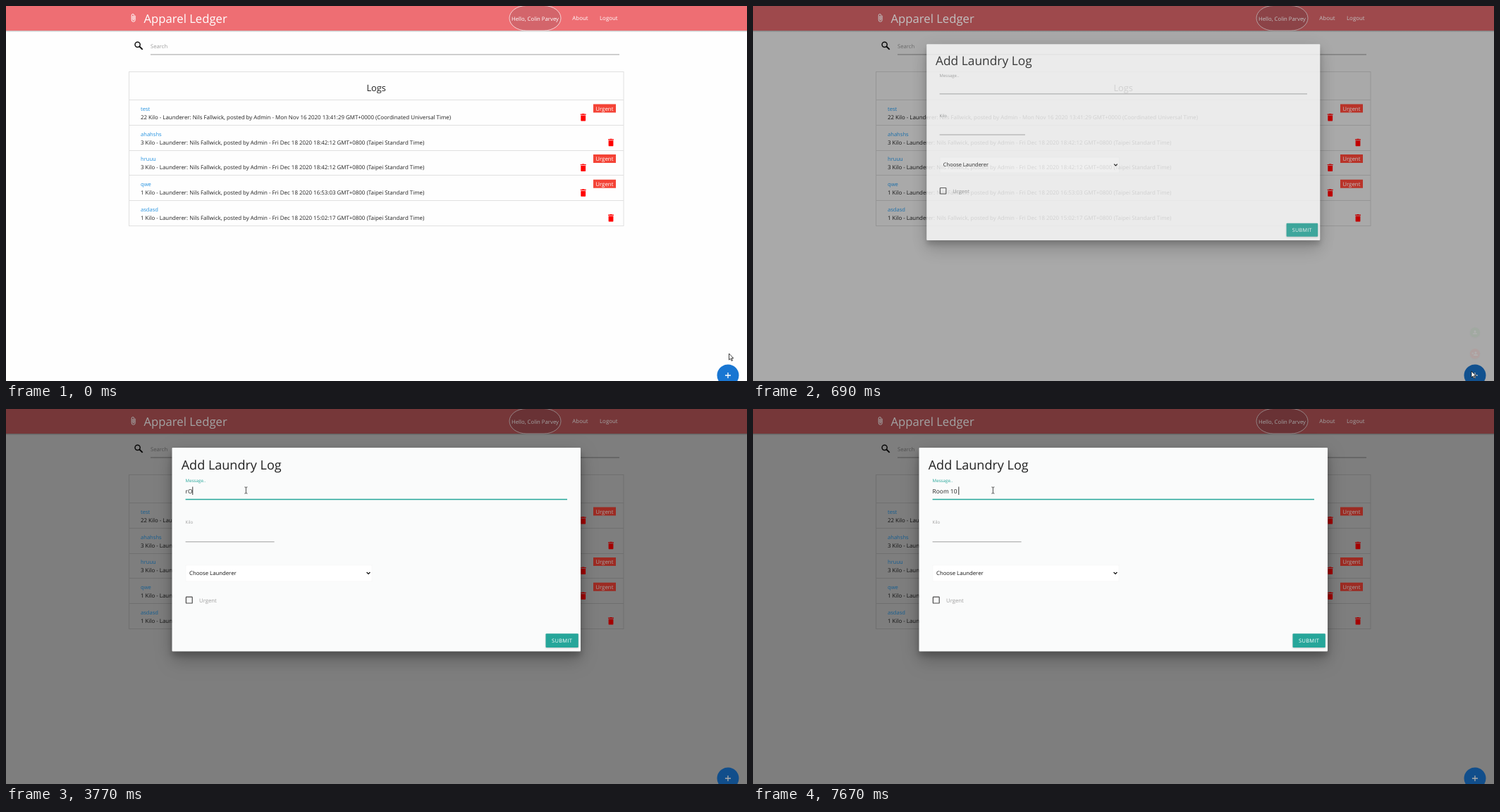
These frames come from a looping animation (1051x533 px, 8000 ms). An HTML page:

```html
<!DOCTYPE html>
<html lang="en">
<head>
<meta charset="utf-8">
<title>Add Laundry Log</title>
<style>
  html, body { margin: 0; width: 100%; height: 100%; overflow: hidden; background: #fefefe; }
  svg { display: block; width: 100%; height: 100%; }
  text { font: 7.92px "Open Sans", "Noto Sans", sans-serif; text-rendering: geometricPrecision; fill: #212121; }
  .white { fill: #fff; }
  .grey { fill: #9e9e9e; }
  .link { fill: #2492e0; font-size: 7.6px; }
  .label { fill: #9e9e9e; font-size: 6.2px; }
  .rule { stroke: #9e9e9e; fill: none; }
  .border { stroke: #e0e0e0; fill: none; }
  #sheet { filter: drop-shadow(0 6px 4px rgba(0,0,0,.2)) drop-shadow(0 5px 13px rgba(0,0,0,.14)) drop-shadow(0 13px 11px rgba(0,0,0,.14)); }
  #submit { filter: drop-shadow(0 1px 1px rgba(0,0,0,.2)); }
  .mini { filter: drop-shadow(0 1px 1px rgba(0,0,0,.25)); }
</style>
</head>
<body>
<svg viewBox="0 0 1051 533" xmlns="http://www.w3.org/2000/svg">
  <defs>
    <path id="trash" fill="#f00" d="M-3.4-3.1h6.8v7q0 1.2-1.2 1.2h-4.4q-1.2 0-1.2-1.2zM-4-5h2.1l.6-.6h2.6l.6.6H4v1.2h-8z"/>
    <g id="person" fill="#fff"><circle cy="-1.5" r="1.5"/><path d="M-3 2.6v-.7q0-1.5 3-1.5t3 1.5v.7z"/></g>
    <linearGradient id="drop" x2="0" y2="1">
      <stop stop-color="#000" stop-opacity=".24"/><stop offset="1" stop-color="#000" stop-opacity="0"/>
    </linearGradient>
  </defs>

  <rect width="1051" height="533" fill="#fefefe"/>
  <g id="page">
    <rect y="35" width="1051" height="2.4" fill="url(#drop)"/>
    <rect width="1051" height="35" fill="#ee6e73"/>
    <rect x="714" y="-.5" width="73" height="35.5" rx="24" ry="17.8" fill="#8a5055" fill-opacity=".27"/>
    <circle cx="186.6" cy="54.8" r="3.6" fill="none" stroke="#111" stroke-width="1.5"/>
    <path d="M189.3 57.5l4.4 4.4" stroke="#111" stroke-width="1.9"/>
    <text x="205" y="60" class="grey" style="font-size:7.7px">Search</text>
    <path class="rule" d="M205 69H870"/>
    <rect class="border" x="174.5" y="93.5" width="701.5" height="219"/>
    <text x="525.2" y="121" text-anchor="middle" style="font-size:12.8px">Logs</text>
  </g>

  <rect id="shade" width="1051" height="533"/>

  <g id="accents">
    <path d="M183.2 13.6v6.2a2.5 2.5 0 0 1-5 0v-6.6a1.7 1.7 0 0 1 3.4 0v6a.8.8 0 0 1-1.7 0v-5.2" fill="none" stroke="#fff"/>
    <text x="195.5" y="24" class="white" style="font-size:16.7px">Apparel Ledger</text>
    <rect x="714" y="-.5" width="73" height="35.5" rx="24" ry="17.8" fill="none" stroke="#fff" stroke-width=".7"/>
    <text x="750.5" y="20.6" class="white" text-anchor="middle" style="font-size:7.75px">Hello, Colin Parvey</text>
    <text x="803.3" y="20.3" class="white">About</text>
    <text x="842" y="20.3" class="white">Logout</text>
  </g>

  <g id="fab">
    <circle cx="1024" cy="525" r="15.5" fill="#1976d2"/>
    <path d="M1020 525h8M1024 521v8" stroke="#fff" stroke-width="1.3"/>
  </g>
  <g id="minis">
    <g transform="translate(1024 464)"><circle class="mini" r="7.2" fill="#4caf50"/><use href="#person"/></g>
    <g transform="translate(1024 494.3)"><circle class="mini" r="7.2" fill="#f44336"/><use href="#person" x="1"/>
      <path d="M-4.6-.6h2.8M-3.2-2v2.8" stroke="#fff" stroke-width=".8"/></g>
  </g>

  <g id="modal">
    <rect id="sheet" x="235.5" y="55" width="579.5" height="289.5" rx="1" fill="#fafbfb"/>
    <text x="248.7" y="86" style="font-size:18.05px">Add Laundry Log</text>
    <text id="label" x="254.6" y="104" class="label">Message..</text>
    <path id="line" class="rule" d="M254.6 128.5H796"/>
    <text id="typed" x="254.6" y="120" style="font-size:8.4px"></text>
    <path id="caret" d="M0 110.5v11.5" stroke="#222" stroke-width=".9"/>
    <text x="254.6" y="163.2" class="label">Kilo</text>
    <path class="rule" d="M254.6 188.8H380.6"/>
    <rect x="255" y="222" width="264" height="23" fill="#fff" stroke="#f3f3f3" stroke-width=".6"/>
    <text x="260" y="236" style="font-size:7.78px;fill:#111">Choose Launderer</text>
    <path d="M511.6 232l2.4 2.4 2.4-2.4" fill="none" stroke="#111" stroke-width="1.3"/>
    <rect x="255.4" y="267.2" width="8.8" height="8.8" rx=".6" fill="none" stroke="#4c4c4c" stroke-width="1.2"/>
    <text x="274" y="274.8" class="grey" style="font-size:7.75px">Urgent</text>
    <rect id="submit" x="765.5" y="319.3" width="46.3" height="19.8" rx="1" fill="#26a69a"/>
    <text x="774" y="332" class="white" style="font-size:7.5px;letter-spacing:.28px">SUBMIT</text>
  </g>

  <path id="arrow" d="M0 0v9l2.1-1.9 1.5 3.3 1.4-.6-1.5-3.2h2.8z" fill="#fff" stroke="#111" stroke-width=".8"/>
  <path id="beam" d="M-2-4.5h1.5l.5.5.5-.5H2M0-4V4M-2 4.5h1.5l.5-.5.5.5H2" fill="none" stroke="#222" stroke-width=".8"/>
</svg>

<script>
const LOOP = 8000;
const $ = id => document.getElementById(id);

function add(parent, tag, attrs, text) {
  const el = document.createElementNS("http://www.w3.org/2000/svg", tag);
  for (const k in attrs) el.setAttribute(k, attrs[k]);
  if (text) el.textContent = text;
  parent.append(el);
}

const rows = [
  ["test", 22, "Mon Nov 16 2020 13:41:29 GMT+0000 (Coordinated Universal Time)", true],
  ["ahahshs", 3, "Fri Dec 18 2020 18:42:12 GMT+0800 (Taipei Standard Time)", false],
  ["hruuu", 3, "Fri Dec 18 2020 18:42:12 GMT+0800 (Taipei Standard Time)", true],
  ["qwe", 1, "Fri Dec 18 2020 16:53:03 GMT+0800 (Taipei Standard Time)", true],
  ["asdasd", 1, "Fri Dec 18 2020 15:02:17 GMT+0800 (Taipei Standard Time)", false]
];

rows.forEach(([title, kilos, date, urgent], i) => {
  const y = 133.5 + i * 35.75;
  const page = $("page"), accents = $("accents");
  add(page, "path", { class: "border", d: `M174.5 ${Math.floor(y) + .5}H876` });
  add(page, "text", { x: 191, y: y + 27.3 }, `${kilos} Kilo - Launderer: Nils Fallwick, posted by Admin - ${date}`);
  add(accents, "text", { class: "link", x: 191, y: y + 15.3 }, title);
  add(accents, "use", { href: "#trash", x: urgent ? 818.7 : 858, y: y + 25 });
  if (urgent) {
    add(accents, "rect", { x: 833, y: y + 6, width: 32, height: 12, fill: "#f44336" });
    add(accents, "text", { class: "white", x: 836.2, y: y + 15.2 }, "Urgent");
  }
});

// Each list holds [start time, value]; a value stays until the next one.
const opening = [[0, 0], [420, .04], [500, .12], [580, .26], [690, .43], [760, .76], [840, 1]];
const minis = [[0, 0], [80, .3], [160, .75], [240, 1], [500, .75], [580, .42], [690, .08], [760, 0]];
const focus = [[0, 0], [1620, .35], [1710, .7], [1880, 1]];
const pointer = [
  [0, [1025.5, 494]], [80, [1023, 505]], [160, [1020, 516]], [240, [1019, 519]],
  [840, [985, 490]], [920, [830, 372]], [1000, [610, 232]], [1075, [455, 140]], [1150, [389, 98]],
  [1230, [380, 104]], [1310, [362, 111]], [1390, [347, 114]], [1470, [340.4, 115.5]]
];
const typing = [
  [0, ""], [3330, "r"], [3770, "rO"], [3850, "rOO"], [4080, "rOOM"], [4230, "rOOM "], [4850, "rOOM"],
  [5240, "rOO"], [5310, "rO"], [5390, "r"], [5460, ""], [5620, "R"], [6230, "Ro"], [6390, "Roo"],
  [6650, "Room"], [6890, "Room "], [7200, "Room 1"], [7280, "Room 10"], [7670, "Room 10 "]
];
const caret = [
  [0, 0], [1620, 1], [2170, 0], [2710, 1], [3180, 0], [3330, 1], [4790, 0], [4850, 1], [6160, 0], [6230, 1]
];

const at = (list, t) => list.findLast(([start]) => start <= t)[1];
const mix = (a, b, k) => `rgb(${a.map((v, i) => Math.round(v + (b[i] - v) * k))})`;
const show = (id, on) => $(id).setAttribute("visibility", on ? "visible" : "hidden");

function draw(t) {
  const k = at(opening, t);
  const dim = 1 - (1 - k) ** 2;
  const pop = 1 - (1 - k) ** 3;
  $("shade").setAttribute("opacity", .5 * dim);
  $("accents").style.filter = `brightness(${1 - .36 * dim})`;
  $("fab").style.filter = `brightness(${1 - (t < 840 ? .47 : .34) * dim})`;
  $("minis").setAttribute("opacity", at(minis, t));

  $("modal").setAttribute("opacity", k ? pop : 0);
  $("modal").setAttribute("transform",
    `translate(525.25 ${55 - 4.5 * (1 - pop)}) scale(${.8 + .2 * pop}) translate(-525.25 -55)`);

  const f = at(focus, t);
  const tint = mix([158, 158, 158], [38, 166, 154], f);
  $("label").style.fill = tint;
  $("line").style.stroke = tint;
  $("line").style.strokeWidth = 1 + .3 * f;

  const typed = $("typed");
  typed.textContent = at(typing, t).replaceAll(" ", "\u00a0");
  const end = typed.textContent ? typed.getComputedTextLength() : 0;
  $("caret").setAttribute("transform", `translate(${254.8 + end} 0)`);
  show("caret", at(caret, t));

  const place = `translate(${at(pointer, t)})`;
  const overInput = t >= 1310;
  for (const id of ["arrow", "beam"]) $(id).setAttribute("transform", place);
  show("arrow", !overInput);
  show("beam", overInput);
}

const begin = performance.now();
function tick() {
  draw((performance.now() - begin) % LOOP);
  requestAnimationFrame(tick);
}
tick();
</script>
</body>
</html>
```
